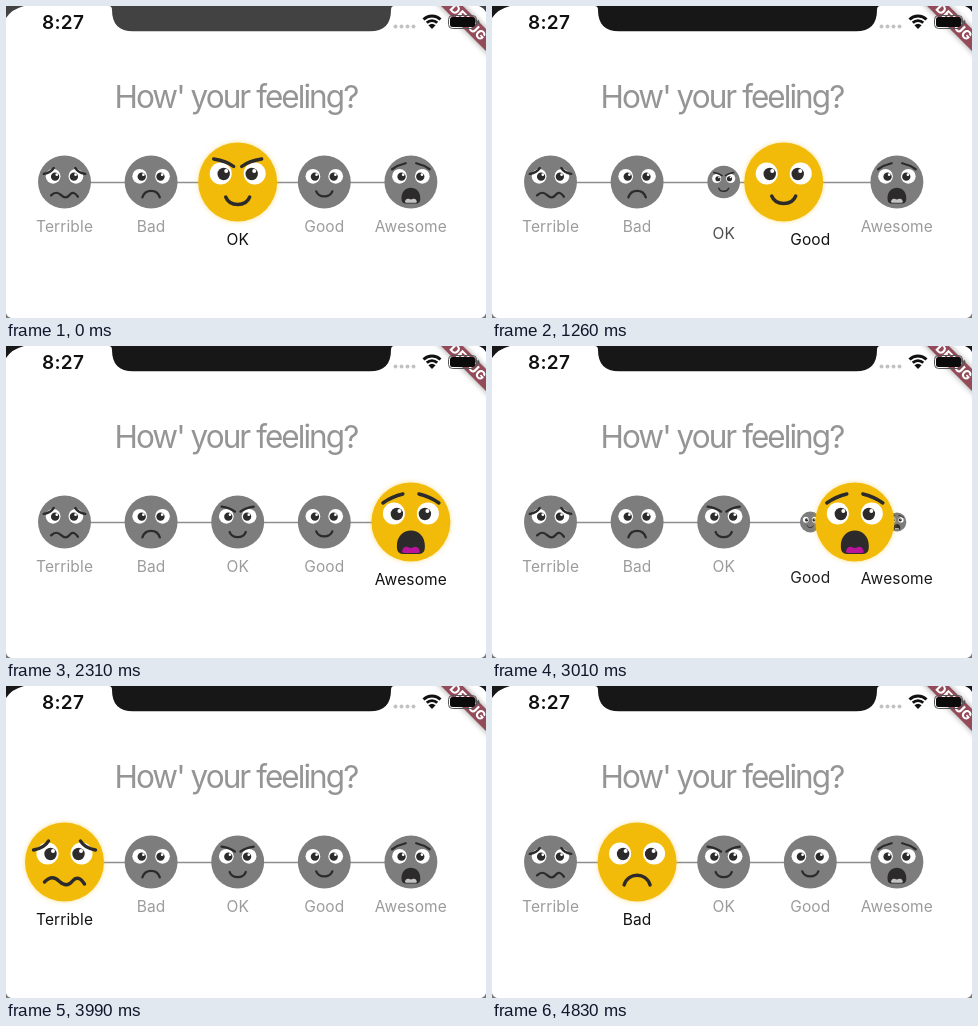
Write an HTML page with a canvas that moves like this. It is 480 by 312 pixels and loops after 4.9 s.

```html
<!DOCTYPE html>
<html lang="en">
<head>
<meta charset="utf-8">
<title>Mood slider</title>
<style>
  html, body { margin: 0; width: 480px; height: 312px; overflow: hidden; background: #fff; }
  canvas { display: block; width: 480px; height: 312px; }
</style>
</head>
<body>
<canvas id="stage"></canvas>
<script>
const LOOP = 4900, MOVE = 280;
const moods = ['Terrible', 'Bad', 'OK', 'Good', 'Awesome'];
const moves = [[1113, 2, 4], [2930, 4, 0], [4009, 0, 1]]; // start ms, from, to
const INK = '#2c2a2b', GREY = '#7d7d7d', YELLOW = '#f2bb0a';

const canvas = document.getElementById('stage');
const dpr = window.devicePixelRatio || 1;
canvas.width = 480 * dpr;
canvas.height = 312 * dpr;
const c = canvas.getContext('2d');

const clamp = v => Math.max(0, Math.min(1, v));
const grey = v => `rgb(${v},${v},${v})`;
const slotX = i => 58.5 + 86.6 * i;

// cubic-bezier(.42, 0, 1, 1)
function easeIn(t) {
  let lo = 0, hi = 1;
  for (let i = 0; i < 20; i++) {
    const s = (lo + hi) / 2, r = 1 - s;
    if (1.26 * r * r * s + 3 * r * s * s + s ** 3 < t) lo = s; else hi = s;
  }
  return 3 * (1 - lo) * lo * lo + lo ** 3;
}

function position(t) {
  let p = 2;
  for (const [start, from, to] of moves)
    if (t >= start) p = from + (to - from) * easeIn(clamp((t - start) / MOVE));
  return p;
}

function disc(x, y, r, color) {
  c.fillStyle = color;
  c.beginPath();
  c.arc(x, y, r, 0, 7);
  c.fill();
}

function stroke(path, width = 3.4, color = INK) {
  c.strokeStyle = color;
  c.lineWidth = width;
  c.lineCap = 'round';
  c.stroke(new Path2D(path));
}

function fill(path, color) {
  c.fillStyle = color;
  c.fill(new Path2D(path));
}

function text(str, x, y, font, color, spacing = 0, align = 'center') {
  c.font = font + ' Inter, sans-serif';
  c.letterSpacing = spacing + 'px';
  c.textAlign = align;
  c.fillStyle = color;
  c.fillText(str, x, y);
}

const details = [
  () => {
    stroke('M-31-12Q-20-14-16-21M31-12Q20-14 16-21');
    stroke('M-20 20C-14 14-10 15-5 19.5S4 24 8 19S16 16 20 22');
  },
  () => stroke('M-13 23C-9 10 9 10 13 23'),
  () => {
    stroke('M-24-23Q-11-21-4-15.5M24-23Q11-21 4-15.5');
    stroke('M-12 15C-8 25 8 25 12 15');
  },
  () => stroke('M-12 14C-8 24 8 24 12 14'),
  active => {
    stroke('M-28-19Q-19-25.5-8-28M28-19Q19-25.5 8-28');
    fill('M-14 25C-15 3 15 3 14 25Q14 32 8 32H-8Q-14 32-14 25Z', INK);
    fill('M-9 30Q-8 24-3 25Q0 27 3 25Q8 24 9 30Q8 31 7 31H-7Z', active ? '#b9159c' : '#c4c4c4');
  }
];

function face(mood, x, scale, active) {
  if (scale < 0.01) return;
  c.save();
  c.translate(x, 176);
  c.scale(scale, scale);
  c.save();
  if (active) {
    c.shadowColor = 'rgba(242,187,10,.45)';
    c.shadowBlur = 5 * dpr;
  }
  disc(0, 0, 39.5, active ? YELLOW : GREY);
  c.restore();
  for (const side of [-1, 1]) {
    disc(17 * side, -8.5, 11, '#fff');
    disc(14 * side, -8, 6.2, INK);
    disc(14 * side + 2.5, -11, 2, '#fff');
  }
  details[mood](active);
  c.restore();
}

function banner() {
  c.save();
  c.translate(462, 16);
  c.rotate(Math.PI / 4);
  c.shadowColor = 'rgba(0,0,0,.4)';
  c.shadowBlur = 6 * dpr;
  c.fillStyle = '#934b59';
  c.fillRect(-60, -7.7, 120, 15.4);
  c.shadowColor = 'transparent';
  text('DEBUG', 0, 4.7, '800 13px', '#fff');
  c.restore();
}

function phone(bezel) {
  banner();
  text('8:27', 36, 22.5, '600 19px', '#111', 0.3, 'left');
  for (let i = 0; i < 4; i++) disc(389.5 + 6 * i, 20.5, 2, '#c2c2c2');

  // wifi
  for (const [r, w] of [[12, 3], [7.4, 2.8]]) {
    c.strokeStyle = '#111';
    c.lineWidth = w;
    c.lineCap = 'butt';
    c.beginPath();
    c.arc(426, 22, r, -Math.PI * 0.75, -Math.PI * 0.25);
    c.stroke();
  }
  fill('M426 23L422.4 19.2Q426 16.2 429.6 19.2Z', '#111');

  // battery
  c.strokeStyle = '#555';
  c.lineWidth = 1;
  c.beginPath();
  c.roundRect(442.5, 9.5, 28, 13, 4);
  c.stroke();
  c.fillStyle = '#0b0b0b';
  c.beginPath();
  c.roundRect(444, 11, 25, 10, 2.5);
  c.fill();
  fill('M472 13.5Q475 16 472 18.5Z', '#555');

  // screen corners and notch
  fill('M0 0H18Q6 3 0 12ZM480 0H473Q478 2 480 6Z', bezel);
  fill('M0 312V307Q1 311 5 312ZM480 312V307Q479 311 475 312Z', '#777');
  fill('M103 0Q106 0 106 4C106 18 113 25.3 127 25.3H364C378 25.3 385 18 385 4Q385 0 388 0Z', bezel);
}

function draw(t) {
  const p = position(t);
  c.setTransform(dpr, 0, 0, dpr, 0, 0);
  c.fillStyle = '#fff';
  c.fillRect(0, 0, 480, 312);
  phone(grey(Math.round(66 - 43 * clamp(t / 280))));
  text("How' your feeling?", 108.5, 102, '400 31.5px', '#959595', -1.95, 'left');
  stroke('M58.5 176.5H405', 1.4, '#8e8e8e');
  moods.forEach((name, i) => {
    const away = Math.abs(i - p);
    face(i, slotX(i), 0.67 * clamp((away - 0.2) / 0.8), false);
    const near = clamp((1 - away) / 0.54);
    text(name, slotX(i), 225.5 + 13 * near, '400 15.5px', grey(Math.round(156 - 138 * near)), 0.15);
  });
  face(Math.round(p), slotX(p), 1, true);
}

function tick() {
  draw(performance.now() % LOOP);
  requestAnimationFrame(tick);
}
tick();
</script>
</body>
</html>
```
